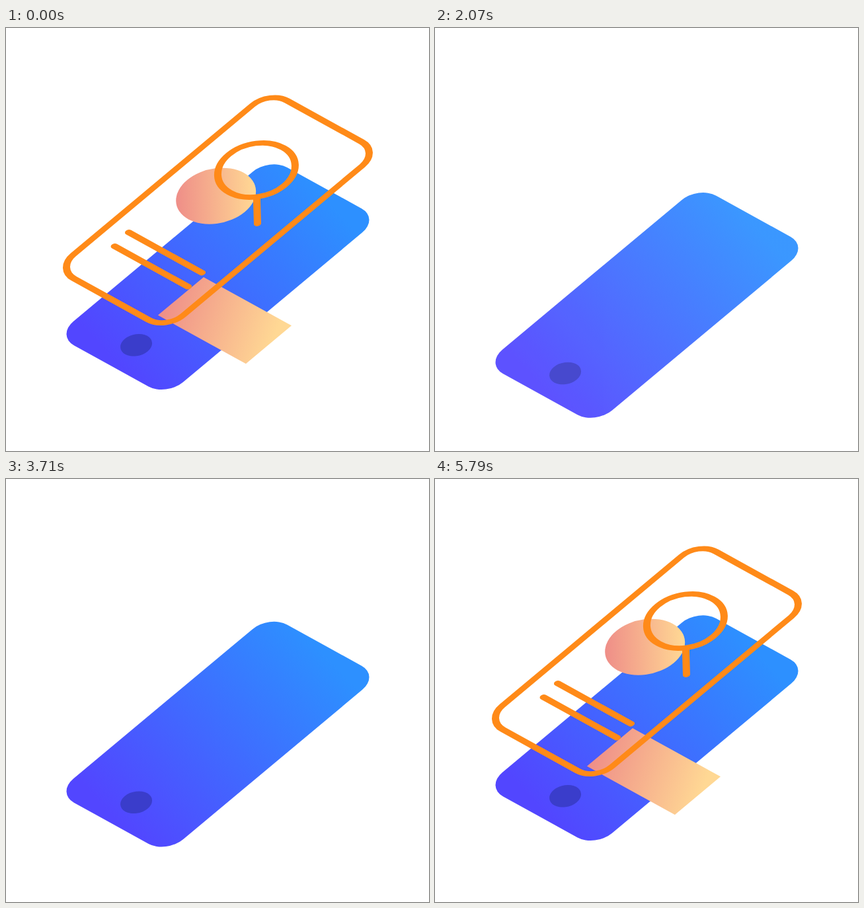
An HTML page that plays this animation: 640 px wide and 640 px high, repeating every 6000 ms.

```html
<!DOCTYPE html>
<html lang="en">
<head>
<meta charset="utf-8">
<title>Isometric phone</title>
<style>
  html, body { margin: 0; width: 100%; height: 100%; overflow: hidden; background: #fff; }
  svg { display: block; width: 100vw; height: 100vh; }
</style>
</head>
<body>
<svg viewBox="0 0 640 640">
  <defs>
    <linearGradient id="blue" gradientUnits="userSpaceOnUse" x1="-60" y1="206" x2="60" y2="-206">
      <stop stop-color="#5246ff"/><stop offset="1" stop-color="#2d90ff"/>
    </linearGradient>
    <linearGradient id="peach" gradientUnits="userSpaceOnUse" x1="-42" y1="41" x2="42" y2="-41">
      <stop stop-color="#ef8f88"/><stop offset="1" stop-color="#ffd894"/>
    </linearGradient>
    <linearGradient id="peachWide" href="#peach" x1="-87" y1="50" x2="74" y2="-42"/>
  </defs>

  <g id="phone">
    <rect x="-115.3" y="-232.5" width="230.6" height="465" rx="37" fill="url(#blue)"/>
    <circle cy="178" r="24" fill="#3a3dcb"/>
  </g>
  <g id="disc"><circle r="60.5" fill="url(#peach)"/></g>
  <g id="card"><rect x="-92.3" y="-49.8" width="184.6" height="99.6" fill="url(#peachWide)"/></g>
  <g id="wire" fill="none" stroke="#ff8a18" stroke-width="11" stroke-linecap="round">
    <path pathLength="100" d="M115.3-195.5V195.5a37 37 0 0 1-37 37H-78.3a37 37 0 0 1-37-37V-195.5a37 37 0 0 1 37-37H78.3a37 37 0 0 1 37 37z"/>
    <path pathLength="100" d="M-12-155.2a58.5 58.5 0 0 1 0 117a58.5 58.5 0 0 1 0-117z"/>
    <path pathLength="100" d="M70.5-13.3L31.5-52.2"/>
    <path pathLength="100" d="M-79.5 112.2H74.8"/>
    <path pathLength="100" d="M-76.4 146.2H78.3"/>
  </g>
</svg>
<script>
const LOOP = 6000;
const [phone, disc, card, wire] = ['phone', 'disc', 'card', 'wire'].map(id => document.getElementById(id));
const strokes = wire.querySelectorAll('path');

// Cubic-bezier ease with flat ends; x1 and x2 are the handle positions.
function ramp(t, start, end, x1 = 1 / 3, x2 = 2 / 3) {
  const x = (t - start) / (end - start);
  if (x <= 0) return 0;
  if (x >= 1) return 1;
  let lo = 0, hi = 1;
  for (let i = 0; i < 24; i++) {
    const s = (lo + hi) / 2, r = 1 - s;
    if (3 * s * r * r * x1 + 3 * s * s * r * x2 + s ** 3 < x) lo = s; else hi = s;
  }
  return lo * lo * (3 - 2 * lo);
}

// Place a layer on the isometric plane: local x, y plus a vertical lift.
function place(el, x, y, lift = 0) {
  const px = 320.5 + 0.7204 * x - 0.6935 * y;
  const py = 376.7 + 0.3977 * x + 0.579 * y + lift;
  el.setAttribute('transform', `matrix(.7204 .3977 -.6935 .579 ${px} ${py})`);
}

function draw(t) {
  const sink = ramp(t, 1833, 2600, 0.24, 0.03) - ramp(t, 2833, 3900, 0.72, 0.7);
  place(phone, 0, 0, 64 * sink);
  phone.setAttribute('opacity', 1 - ramp(t, 1967, 2633) + ramp(t, 2800, 3440));

  const away = ramp(t, 733, 1433) - ramp(t, 4000, 4767);
  place(disc, -125 - 72 * away, -125.8);
  place(card, 74.6 + 98 * away, 62.4);
  disc.setAttribute('opacity', 1 - away);
  card.setAttribute('opacity', 1 - away);

  const drop = ramp(t, 0, 833) - ramp(t, 4767, 5740);
  const drawn = 1 - ramp(t, 233, 1000) + ramp(t, 4867, 5567);
  place(wire, 0, 0, -101 * (1 - drop));
  wire.style.display = drawn > 0.001 ? '' : 'none';
  const dash = drawn > 0.999 ? 'none' : `${100 * drawn} 200`;
  strokes.forEach(s => s.setAttribute('stroke-dasharray', dash));
}

const begin = performance.now();
function tick() {
  draw((performance.now() - begin) % LOOP);
  requestAnimationFrame(tick);
}
tick();
</script>
</body>
</html>
```
